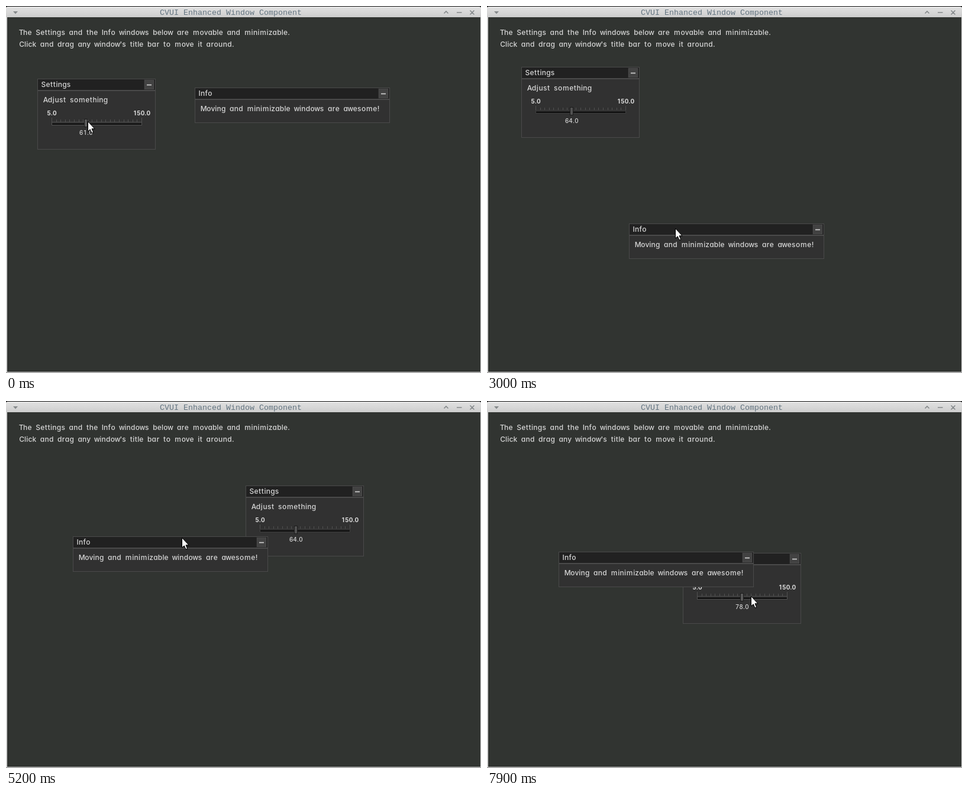
Animation, 803 px wide and 621 px high, one loop 8 s. Source, as an HTML page:

```html
<!DOCTYPE html>
<html lang="en">
<head>
<meta charset="utf-8">
<title>CVUI Enhanced Window Component</title>
<style>
  html, body { margin: 0; width: 100%; height: 100%; overflow: hidden; background: #313431; }
  svg { display: block; width: 100%; height: 100%; }
  .label { font-family: Inter, "Open Sans", sans-serif; font-weight: 500; font-feature-settings: "cv11"; fill: #d6d6d6; text-anchor: middle; }
  .strong { font-weight: 700; fill: #dedede; }
  .caption { font: 13.333px "Liberation Mono", monospace; fill: #637480; }
  .icon { fill: none; stroke: #85898b; stroke-width: 1.6; }
  .path { fill: #292929; stroke: #3e3e3e; }
  .knob { fill: #515151; stroke: #1b1b1b; }
  .over .path { stroke: #525252; }
  .over .knob { fill: #5a5a5a; }
</style>
</head>
<body>
<svg id="stage" viewBox="0 0 803 621">
  <defs>
    <linearGradient id="bar" x2="0" y2="1">
      <stop stop-color="#e2e2e2"/><stop offset="1" stop-color="#cdcdcd"/>
    </linearGradient>
  </defs>
  <rect width="803" height="621" fill="#d4d4d4"/>
  <rect width="803" height="2" fill="#151515"/>
  <path d="M0 19V4Q0 1 3 1H800Q803 1 803 4V19Z" fill="url(#bar)"/>
  <rect x="2" y="19" width="800" height="600" fill="#313431"/>
  <rect y="620" width="803" height="1" fill="#8b8b8b"/>
  <path d="M12 9h8l-4 4.5z" fill="#85898b"/>
  <path class="icon" d="M740.5 12.5l3.5-3.5l3.5 3.5M762 11h8.500M784.500 7.500l7 7m0-7l-7 7"/>
  <text class="caption" x="260" y="15">CVUI Enhanced Window Component</text>
</svg>
<script>
const stage = document.getElementById('stage');

function add(parent, tag, attrs, content = '') {
  const el = document.createElementNS('http://www.w3.org/2000/svg', tag);
  for (const key in attrs) el.setAttribute(key, attrs[key]);
  el.textContent = content;
  parent.append(el);
  return el;
}

function rect(parent, x, y, width, height, attrs) {
  return add(parent, 'rect', { x, y, width, height, ...attrs });
}

// Letter advances of a stroke font, in font units, grouped by width.
const advance = {};
const widths = {
  8: "Iil'", 10: '.!j', 12: 'ft', 13: 'r', 16: ' Tvy', 17: 'ksxz',
  18: 'Ace', 20: 'S0123456789', 21: 'C', 22: 'w', 24: 'M', 30: 'm'
};
for (const w in widths) for (const ch of widths[w]) advance[ch] = +w;

// Each letter sits in the middle of its advance cell.
function label(parent, str, x, y, scale = 0.4, extra = '') {
  const xs = [];
  for (const ch of str) {
    const w = (advance[ch] || 19) * scale;
    xs.push((x + w / 2).toFixed(2));
    x += w;
  }
  const attrs = { class: 'label ' + extra, x: xs.join(' '), y, 'font-size': scale * 30 };
  return add(parent, 'text', attrs, str);
}

function panel(title, w, h) {
  const g = add(stage, 'g', {});
  rect(g, 0, 0, w, h, { fill: '#4a4a4a' });
  rect(g, 1, 1, w - 2, 18, { fill: '#212121' });
  rect(g, 1, 21, w - 2, h - 22, { fill: '#313131' });
  label(g, title, 6.5, 14);
  rect(g, w - 20, 1, 18, 18, { fill: '#292929' });
  rect(g, w - 19, 2, 16, 16, { fill: '#4a4a4a' });
  rect(g, w - 18, 3, 14, 14, { fill: '#424242' });
  rect(g, w - 15, 9.7, 8, 1.7, { fill: '#cecece' });
  return g;
}

label(stage, 'The Settings and the Info windows below are movable and minimizable.', 22.5, 49);
label(stage, "Click and drag any window's title bar to move it around.", 22.5, 69);

const settingsEl = panel('Settings', 200, 120);
label(settingsEl, 'Adjust something', 10.5, 40);
label(settingsEl, '5.0', 16.2, 62, 0.33, 'strong');
label(settingsEl, '150.0', 161.5, 62, 0.33, 'strong');
for (let i = 0; i <= 20; i++) {
  const top = i % 20 ? 69 : 66;
  rect(settingsEl, 24 + Math.round(i * 7.6), top, 1, 73 - top, { fill: '#515151' });
}
rect(settingsEl, 24.5, 73.5, 152, 5, { class: 'path' });
rect(settingsEl, 25, 76, 151, 2, { fill: '#0e0e0e' });
const sliderEl = add(settingsEl, 'g', {});
rect(sliderEl, -2.5, 68.5, 5, 13, { class: 'knob' });
const readout = label(sliderEl, '61.0', -11.3, 95, 0.33);

const infoEl = panel('Info', 330, 60);
label(infoEl, 'Moving and minimizable windows are awesome!', 10.5, 40);

const cursorEl = add(stage, 'g', {});
const arrow = 'M-.5-.5V16L3.300 12.800L6 18.900L8.600 17.800L6 11.800H11Z';
add(cursorEl, 'path', { d: arrow, transform: 'translate(1 1)', fill: '#000', opacity: 0.35 });
add(cursorEl, 'path', { d: arrow, fill: '#fff', stroke: '#000' });

// Pointer stops: [arrival, x, y, rest], in ticks of 100 ms.
const stops = [
  [0, 139, 196, 2], [4, 132, 198], [6.5, 142, 199], [10, 177, 138], [12, 168, 125, 1],
  [15.5, 135, 139], [16, 154, 126], [19, 173, 105], [22, 398, 147], [23.5, 365, 192, 2.5],
  [29, 319, 377, 1], [32, 312, 379], [34, 190, 62], [35, 172, 108], [40.5, 519, 148],
  [45, 418, 373, 1], [51, 298, 232, 1], [54.5, 239, 155], [57, 501, 162, 3], [61, 490, 202],
  [63.5, 427, 276], [66, 239, 160, 2], [71.5, 306, 263, 1.5], [77, 418, 337, 1], [79, 447, 331]
];

// Parts move only while held: each hold is [press, release].
const knob = { x: 82, y: 0, holds: [[2, 6.5], [78, 80]] };
const settings = { x: 53, y: 123, holds: [[13, 19], [35, 40.5], [60, 63.5]] };
const info = { x: 319, y: 138, holds: [[22, 32], [46, 54.5], [68, 71.5]] };

function pointer(tick) {
  const i = stops.findIndex(stop => stop[0] > tick);
  if (i < 0) return stops[stops.length - 1].slice(1, 3);
  const [t0, x0, y0, rest = 0] = stops[i - 1];
  const [t1, x1, y1] = stops[i];
  const k = Math.max(0, (tick - t0 - rest) / (t1 - t0 - rest));
  const ease = k * k * (3 - 2 * k);
  return [x0 + (x1 - x0) * ease, y0 + (y1 - y0) * ease];
}

// A held part follows the pointer half a tick late.
function place(part, tick) {
  let { x, y } = part;
  for (const [press, release] of part.holds) {
    const [ax, ay] = pointer(press);
    const [bx, by] = pointer(Math.min(release, Math.max(press, tick - 0.5)));
    x += bx - ax;
    y += by - ay;
  }
  return [Math.round(x), Math.round(y)];
}

function move(el, x, y) {
  el.setAttribute('transform', `translate(${x} ${y})`);
}

function draw(tick) {
  const [sx, sy] = place(settings, tick);
  const [cx, cy] = pointer(tick).map(Math.round);
  const [kx] = place(knob, tick);
  move(settingsEl, sx, sy);
  move(infoEl, ...place(info, tick));
  move(cursorEl, cx, cy);
  move(sliderEl, kx, 0);
  readout.textContent = (5 + Math.round((kx - 23.4) / 152 * 145)).toFixed(1);
  const over = cx > sx + 14 && cx < sx + 186 && cy > sy + 60 && cy < sy + 95;
  settingsEl.setAttribute('class', over ? 'over' : '');
}

const start = performance.now();
let shown = -1;
function loop(now) {
  const tick = Math.floor(Math.max(0, now - start) % 8000 / 100);
  if (tick !== shown) draw(shown = tick);
  requestAnimationFrame(loop);
}
loop(start);
</script>
</body>
</html>
```
